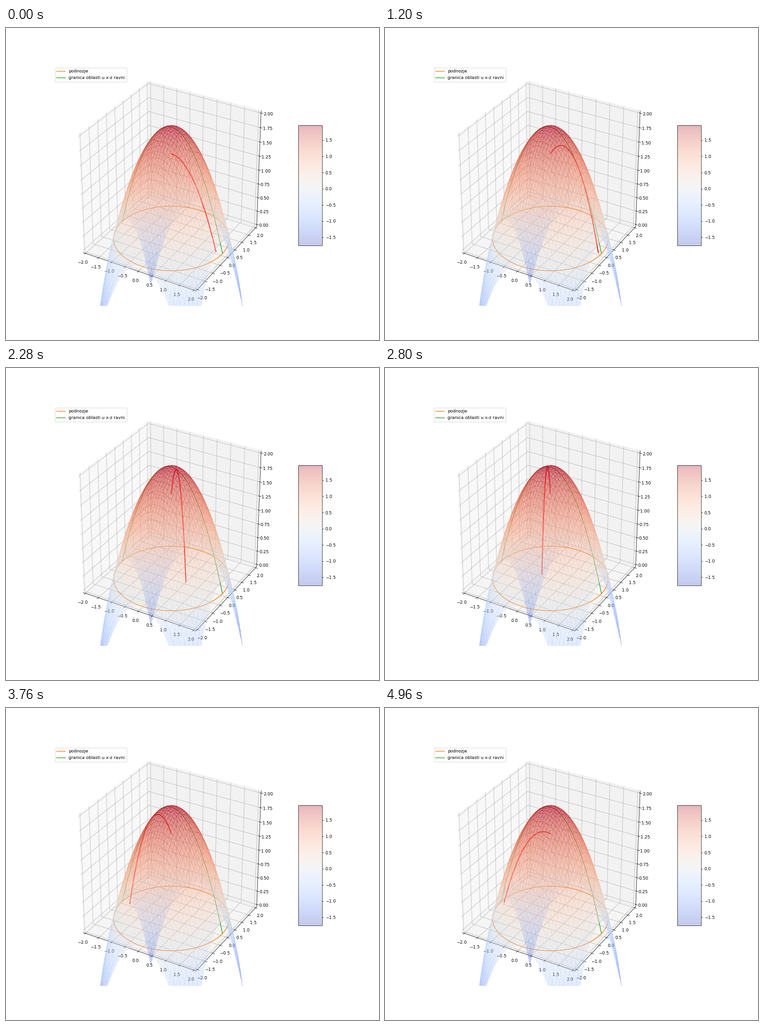
Animation of 800x667 px, one loop 5000 ms. Source, as a matplotlib script:

```python
import numpy as np
import matplotlib.pyplot as plt
from matplotlib.animation import FuncAnimation

W, H, DPI = 800, 667, 200 / 3
FRAMES, INTERVAL = 125, 40

# Projectile launched from height H0 with speed V
G, V, H0 = 9.81, 3.0, 1.5
REACH = V * np.sqrt(V**2 + 2 * G * H0) / G
STEP = np.radians(1.38)


def envelope(r2):
    """Height of the safety paraboloid at squared distance r2."""
    return H0 + V**2 / (2 * G) - G * r2 / (2 * V**2)


def trajectory(angle):
    """Path in the x-z plane from launch to landing."""
    vx, vz = V * np.cos(angle), V * np.sin(angle)
    t = np.linspace(0, (vz + np.sqrt(vz**2 + 2 * G * H0)) / G, 80)
    return vx * t, np.zeros_like(t), H0 + vz * t - G * t**2 / 2


def padded(lo, hi):
    pad = (hi - lo) / 48
    return lo - pad, hi + pad


# The tiny surplus keeps rounding from losing a pixel
fig = plt.figure(figsize=((W + 0.01) / DPI, (H + 0.01) / DPI), dpi=DPI)
ax = fig.add_subplot(projection="3d")
ax.view_init(elev=30, azim=-60)
ax.set_box_aspect((1, 1, 1), zoom=np.sqrt(3) / 1.8294640721620434)
ax.apply_aspect = lambda position=None: None  # fill the whole slot

grid = np.arange(-REACH, REACH, 0.1)
X, Y = np.meshgrid(grid, grid)
surf = ax.plot_surface(X, Y, envelope(X**2 + Y**2), cmap="coolwarm",
                       alpha=0.3, linewidth=0, antialiased=False)

phi = np.linspace(0, 2 * np.pi, 200)
ax.plot(REACH * np.cos(phi), REACH * np.sin(phi), 0 * phi,
        color="C1", label="podnozje")
x = np.linspace(-REACH, REACH, 100)
ax.plot(x, 0 * x, envelope(x**2), color="C2",
        label="granica oblasti u x-z ravni")
path, = ax.plot(*trajectory(0), color="red", lw=2)

ax.set(xlim=padded(-2, 2), ylim=padded(-2, 2), zlim=padded(0, 2))
ax.set_xticks(np.arange(-2, 2.1, 0.5))
ax.set_yticks(np.arange(-2, 2.1, 0.5))
ax.set_zticks(np.arange(0, 2.1, 0.25))
ax.legend(loc="upper left")
fig.colorbar(surf, ax=ax, shrink=0.5, aspect=5, ticks=np.arange(-1.5, 1.6, 0.5))


def update(i):
    path.set_data_3d(*trajectory(i * STEP))
    return path,


anim = FuncAnimation(fig, update, frames=FRAMES, interval=INTERVAL,
                     repeat=True, repeat_delay=0)
plt.show()
```
